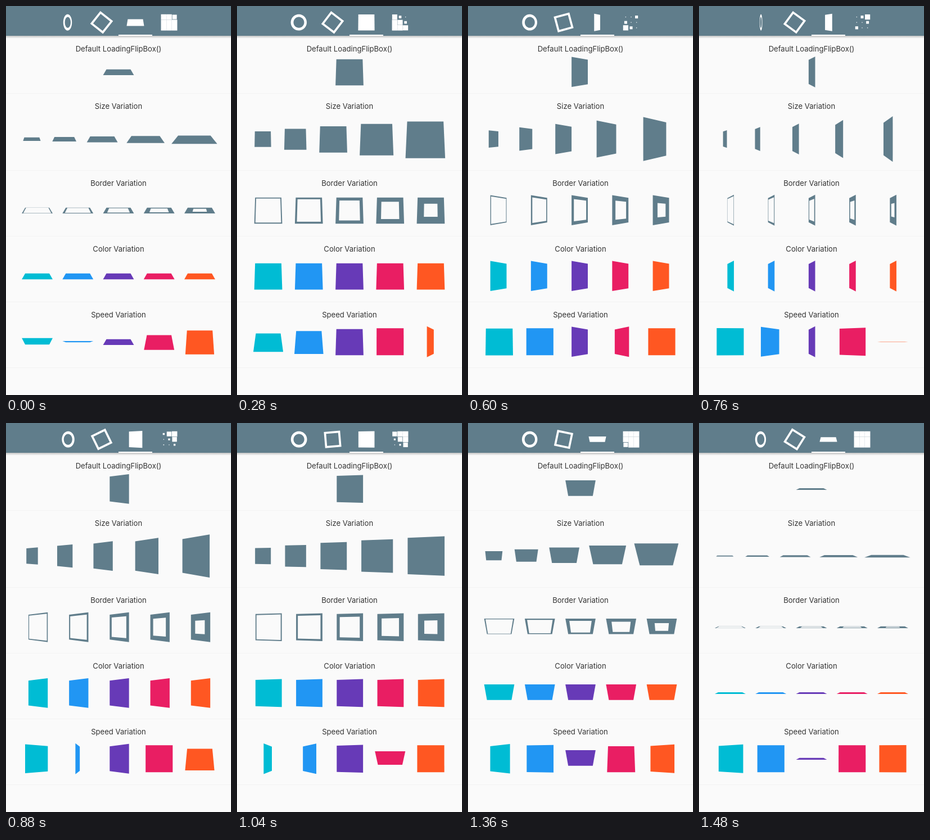
Write an HTML page with a canvas that moves like this. It is 400 px wide and 692 px high and loops after 1520 ms.

```html
<!DOCTYPE html>
<html>
<head>
<meta charset="utf-8">
<style>
  html, body { margin: 0; width: 100%; height: 100%; overflow: hidden; background: #fafafa; }
  canvas { display: block; }
</style>
</head>
<body>
<canvas id="stage" width="400" height="692"></canvas>
<script>
const ctx = document.getElementById('stage').getContext('2d');
const LOOP = 1520, RATE = 0.994;
const SCALE = 0.963, WIDTH = 400 / SCALE, MID = WIDTH / 2;
const PERSPECTIVE = 0.005;
const SLATE = '#607d8b';
const COLORS = ['#00bcd4', '#2196f3', '#673ab7', '#e91e63', '#ff5722'];
const SIZES = [30, 40, 50, 60, 70];
const BORDERS = [2, 3.5, 6, 8.5, 12.5];
const DURATIONS = [2100, 1800, 1500, 1200, 900];

// Cubic easing with control points (x1, 0) and (x2, 1)
function ease(x, x1, x2) {
  let lo = 0, hi = 1;
  for (let i = 0; i < 24; i++) {
    const s = (lo + hi) / 2, r = 1 - s;
    if (3 * r * r * s * x1 + 3 * r * s * s * x2 + s * s * s < x) lo = s; else hi = s;
  }
  return lo * lo * (3 - 2 * lo);
}
const easeOut = x => ease(x, 0, 0.58);
const easeInOut = x => ease(x, 0.42, 0.58);

const square = r => [[-r, -r], [r, -r], [r, r], [-r, r]];
const circle = r => Array.from({ length: 60 }, (_, i) =>
  [r * Math.cos(i * Math.PI / 30), r * Math.sin(i * Math.PI / 30)]);

// Fills closed outlines turned about the x and y axes, seen in perspective
function drawTurned(cx, cy, outlines, color, ax, ay) {
  ctx.beginPath();
  for (const outline of outlines) {
    outline.forEach(([x, y], i) => {
      const w = 1 + PERSPECTIVE * (x * Math.sin(ay) + y * Math.sin(ax));
      const px = cx + x * Math.cos(ay) / w, py = cy + y * Math.cos(ax) / w;
      if (i) ctx.lineTo(px, py); else ctx.moveTo(px, py);
    });
    ctx.closePath();
  }
  ctx.fillStyle = color;
  ctx.fill('evenodd');
}

function flipBox(cx, cy, elapsed, { size = 50, color = SLATE, border = 0, duration = 1500 } = {}) {
  const phase = elapsed % duration / duration * 2;
  const outlines = [square(size / 2)];
  if (border) outlines.push(square(size / 2 - border));
  drawTurned(cx, cy, outlines, color,
    Math.PI * easeOut(Math.min(phase, 1)), Math.PI * easeOut(Math.max(phase - 1, 0)));
}

function rect(x, y, w, h, color) {
  ctx.fillStyle = color;
  ctx.fillRect(x, y, w, h);
}

function section(title, baseline, divider) {
  ctx.fillStyle = '#333';
  ctx.fillText(title, MID, baseline);
  rect(0, divider, WIDTH, 1, '#f3f3f3');
}

function drawHeader(elapsed) {
  const bottom = 53 / SCALE, iconY = 30.3, tab = 60 / SCALE;
  const iconX = i => MID + tab * (i - 1.5);
  const shadow = ctx.createLinearGradient(0, bottom, 0, bottom + 5);
  shadow.addColorStop(0, 'rgba(0,0,0,.22)');
  shadow.addColorStop(1, 'rgba(0,0,0,0)');
  rect(0, bottom, WIDTH, 5, shadow);
  rect(0, 0, WIDTH, bottom, SLATE);
  rect(MID, bottom - 2.1, tab, 2.1, '#fff');

  const turn = easeInOut(elapsed % 1500 / 1500);
  drawTurned(iconX(0), iconY, [circle(15), circle(10)], '#fff', 0, 3 * Math.PI * turn);

  ctx.save();
  ctx.translate(iconX(1), iconY);
  ctx.rotate(2 * Math.PI * turn);
  drawTurned(0, 0, [square(15), square(11.2)], '#fff', 0, 0);
  ctx.restore();

  flipBox(iconX(2), iconY, elapsed, { size: 30, color: '#fff' });

  for (let row = 0; row < 3; row++) {
    for (let col = 0; col < 3; col++) {
      const smallest = 690 + 165 * (row + 2 - col);
      const growth = easeInOut(Math.min(1, Math.abs(elapsed - smallest) / 480));
      const size = 10 * Math.max(0.13, growth);
      const x = iconX(3) + 10 * (col - 1), y = iconY + 10 * (row - 1);
      rect(x - size / 2, y - size / 2, size, size, '#fff');
    }
  }
}

function draw(t) {
  const elapsed = t * RATE + 297;
  ctx.setTransform(SCALE, 0, 0, SCALE, 0, 0);
  rect(0, 0, WIDTH, 720, '#fafafa');
  ctx.font = '13.6px Inter, sans-serif';
  ctx.textAlign = 'center';

  section('Default LoadingFlipBox()', 84.6, 161);
  section('Size Variation', 190.1, 303.2);
  section('Border Variation', 331.9, 424.7);
  section('Color Variation', 453.5, 546.2);
  section('Speed Variation', 574.9, 667.7);

  flipBox(MID, 121.8, elapsed);
  let left = MID - 175;
  for (let i = 0; i < 5; i++) {
    const x = MID + 75 * (i - 2), size = SIZES[i], color = COLORS[i];
    flipBox(left + size / 2, 245.7, elapsed, { size });
    left += size + 25;
    flipBox(x, 377.2, elapsed, { border: BORDERS[i] });
    flipBox(x, 498.8, elapsed, { color });
    flipBox(x, 620.2, elapsed, { color, duration: DURATIONS[i] });
  }
  drawHeader(t * RATE + 341);
}

const start = performance.now();
function tick() {
  draw((performance.now() - start) % LOOP);
  requestAnimationFrame(tick);
}
tick();
</script>
</body>
</html>
```
